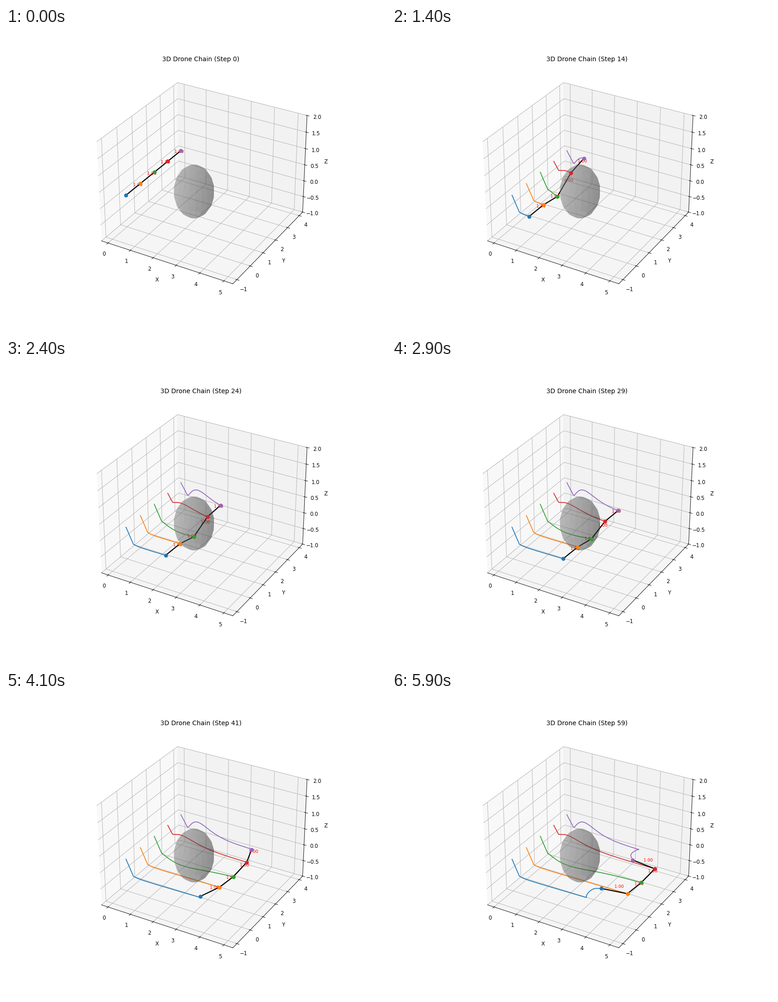
A matplotlib script that plays this animation: 837x669 px, repeating every 6 s.

```python
import numpy as np
import matplotlib.pyplot as plt
from matplotlib.animation import FuncAnimation
from matplotlib.lines import Line2D
from matplotlib.transforms import Affine2D
from mpl_toolkits.mplot3d import proj3d

W, H, DPI = 837, 669, 83
STEPS = 60
LABEL_LIFT = 6.9

# The small margin keeps the canvas from being rounded down a pixel
fig = plt.figure(figsize=((W + 0.01) / DPI, (H + 0.01) / DPI), dpi=DPI)
ax = fig.add_subplot(111, projection="3d", computed_zorder=False)

# Obstacle
u = np.linspace(0, 2 * np.pi, 20)
v = np.linspace(0, np.pi, 10)
r = 0.775
ax.plot_surface(2.1 + r * np.outer(np.cos(u), np.sin(v)),
                1.5 + r * np.outer(np.sin(u), np.sin(v)),
                r * np.outer(np.ones_like(u), np.cos(v)),
                color="gray", alpha=0.3, zorder=4)

ax.set(xlim=(-0.3, 5.37), ylim=(-1.3, 4.3), zlim=(-1, 2),
       xlabel="X", ylabel="Y", zlabel="Z")
title = ax.set_title("")
fig.canvas.draw()


def to_stage(x, y, z):
    """Project a point of the scene to pixels from the top left."""
    px, py, _ = proj3d.proj_transform(x, y, z, ax.get_proj())
    sx, sy = ax.transData.transform((px, py))
    return np.array([sx, H - sy])


t = np.arange(STEPS)


def ease(start, length):
    p = np.clip((t - start) / length, 0, 1)
    return p * p * (3 - 2 * p)


def bump(height, start, rise):
    """Quick rise to the given height, then a slow decay."""
    p = np.maximum(t - start, 0) / rise
    return height * (p * np.exp(1 - p)) ** 2


# Drift shared by all drones: descend, turn, cruise, brake
cruise = np.maximum(t - 9, 0)
brake = np.exp(-np.maximum(t - 48, 0) / 2)
vx = np.where(t < 9, 1.8, 5.1 - 1.2 * np.exp(-cruise / 4)) * brake
vy = np.where(t < 9, 4.15, 1.5 + 0.8 * np.exp(-cruise / 2)) * brake
drift = np.column_stack([np.cumsum(vx) - vx, np.cumsum(vy) - vy])


def fly(k, dodge=0, swing=(0, 0), hold=STEPS):
    """Drift from the start, dodge the obstacle, then swing after the hold."""
    offset = np.zeros((STEPS, 2))
    offset[:, 0] = swing[0]
    offset[:, 1] = dodge + swing[1]
    return to_stage(0, k, 0) + drift[np.minimum(t, hold)] + offset


lift = -6 * np.minimum(t / 8, 1)
drones = [
    fly(0, swing=(33 * ease(41, 12), -20 * ease(39, 9)), hold=39),
    fly(1),
    fly(2, dodge=bump(10.5, 9, 11)),
    fly(3, dodge=lift + bump(-16, 5.5, 7)),
    fly(4, dodge=lift + bump(-24, 8, 6), hold=38,
        swing=(4 * ease(46, 5) - 18 * ease(39, 7.5), 23 * ease(40, 12))),
]

stage = (Affine2D().scale(1 / DPI, -1 / DPI).translate(0, H / DPI)
         + fig.dpi_scale_trans)


def add_line(**style):
    return ax.add_artist(Line2D([], [], transform=stage, **style))


trails = [add_line(color=f"C{k}", lw=1.5, zorder=2) for k in range(5)]
links = [add_line(color="black", lw=2, zorder=2.1) for _ in range(4)]
dots = [add_line(color=f"C{k}", ls="", marker="o", ms=6, mew=1.5, zorder=5)
        for k in range(5)]
labels = [ax.text2D(0, 0, "1.00", color="red", fontsize=8, zorder=3,
                    transform=stage) for _ in links]


def update(step):
    title.set_text(f"3D Drone Chain (Step {step})")
    for path, trail, dot in zip(drones, trails, dots):
        trail.set_data(*path[:step + 1].T)
        dot.set_data(*path[step:step + 1].T)
    spots = [path[step] for path in drones]
    for a, b, link, label in zip(spots, spots[1:], links, labels):
        link.set_data(*np.array([a, b]).T)
        x, y = (a + b) / 2
        label.set_position((x, y - LABEL_LIFT))
    return [title, *trails, *links, *dots, *labels]


anim = FuncAnimation(fig, update, frames=STEPS, interval=100,
                     init_func=lambda: update(0), repeat=True)
plt.show()
```
